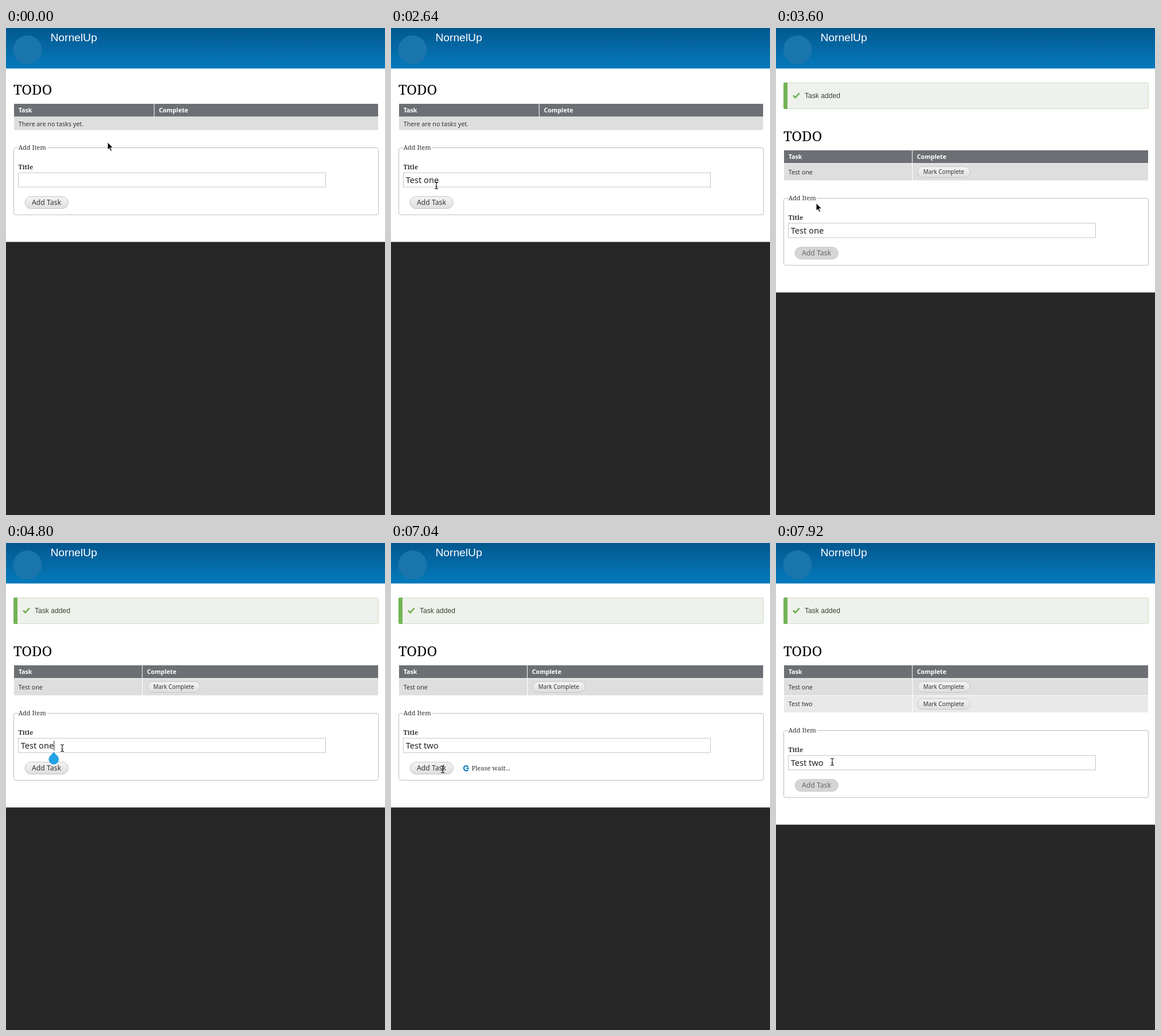
Write an HTML page that moves like this. It is 660 by 848 pixels and loops after 8000 ms.

```html
<!DOCTYPE html>
<html lang="en">
<head>
<meta charset="utf-8">
<title>Todo list</title>
<style>
  html, body { margin: 0; width: 100%; height: 100%; overflow: hidden; background: #272727; }
  svg { display: block; width: 660px; height: 848px; }
  text { font: 10.7px "Noto Sans", "Open Sans", sans-serif; fill: #333; white-space: pre; }
  .serif { font: 11px "Noto Serif", serif; }
  .bold { font-weight: bold; }
  .site { font: 19.2px "Liberation Sans", Arial, sans-serif; fill: #fff; }
  .note { font: 12.1px "Liberation Sans", Arial, sans-serif; fill: #3a4733; }
  .h1 { font-size: 24px; fill: #000; }
  .th { font-weight: bold; fill: #fff; }
  .small { font-size: 9.9px; }
  .mid { font-size: 12.2px; }
  .entry { font-size: 14.6px; fill: #222; }
  .pill { fill: url(#pill); stroke: #c6c6c6; }
  .off .pill { fill: #d5d5d5; stroke: #cbcbcb; }
  .off text { fill: #666; }

  /* layout for an empty list, one task, two tasks */
  .one, .two { display: none; }
  [data-tasks="1"] .one, [data-tasks="2"] .one, [data-tasks="2"] .two { display: inline; }
  [data-tasks="1"] .none, [data-tasks="2"] .none { display: none; }
  [data-tasks="1"] .list, [data-tasks="2"] .list { transform: translateY(81px); }
  [data-tasks="1"] .col, [data-tasks="2"] .col { transform: translateX(-20.7px); }
  [data-tasks="1"] .form { transform: translateY(88px); }
  [data-tasks="2"] .form { transform: translateY(118px); }
</style>
</head>
<body>
<svg id="stage" viewBox="0 0 660 848" data-tasks="0">
  <defs>
    <linearGradient id="head" x2="0" y2="1">
      <stop stop-color="#03588f"/><stop offset="1" stop-color="#057abc"/>
    </linearGradient>
    <linearGradient id="pill" x2="0" y2="1">
      <stop stop-color="#f4f4f4"/><stop offset="1" stop-color="#dedede"/>
    </linearGradient>
  </defs>

  <rect width="660" height="848" fill="#272727"/>
  <g class="form"><rect y="-130" width="660" height="502.5" fill="#fff"/></g>
  <rect width="660" height="70.5" fill="url(#head)"/>
  <circle cx="37.5" cy="38" r="25" fill="#1b75ad"/>
  <text class="site" x="77.5" y="23.3">NornelUp</text>

  <g class="one">
    <rect x="13.5" y="95.5" width="635" height="45" rx="2" fill="#eff1ec" stroke="#c9e1bd"/>
    <path d="M15 95H20V141H15Q13 141 13 139V97Q13 95 15 95Z" fill="#73b355"/>
    <path d="M30 117.5L33.7 121.3L40.7 113.3" fill="none" stroke="#73b355" stroke-width="2.8"/>
    <text class="note" x="50" y="122">Task added</text>
  </g>

  <g class="list">
    <text class="serif h1" x="13" y="115.5">TODO</text>
    <rect x="14" y="132" width="634" height="22.3" fill="#6c7075"/>
    <text class="th" x="21.7" y="147.3">Task</text>
    <g class="none">
      <rect x="14" y="155" width="634" height="22.7" fill="#dedede"/>
      <text x="21.7" y="170.7">There are no tasks yet.</text>
    </g>
    <g class="col">
      <rect x="257.5" y="132" width="1" height="22.5" fill="#fff"/>
      <text class="th" x="266.2" y="147.3">Complete</text>
    </g>
  </g>

  <g class="one">
    <rect x="14" y="236.5" width="634" height="28.8" fill="#dedede"/>
    <rect x="237" y="236" width="1" height="30" fill="#fff"/>
    <text x="21.7" y="254.6">Test one</text>
    <rect class="pill" x="246.5" y="241.5" width="91.5" height="18.5" rx="9.2"/>
    <text class="small" x="256.5" y="254.4">Mark Complete</text>
  </g>
  <g class="two">
    <rect x="14" y="266.3" width="634" height="28.7" fill="#e9e9e9"/>
    <rect x="237" y="266" width="1" height="29" fill="#fff"/>
    <text x="21.7" y="284.4">Test two</text>
    <rect class="pill" x="246.5" y="271.2" width="91.5" height="18.5" rx="9.2"/>
    <text class="small" x="256.5" y="284.1">Mark Complete</text>
  </g>

  <g class="form">
    <rect x="13.5" y="208.5" width="635" height="116.7" rx="3.5" fill="none" stroke="#bcbcbc"/>
    <rect x="21" y="206" width="51" height="5" fill="#fff"/>
    <text class="serif" x="21.5" y="212">Add Item</text>
    <text class="serif bold" x="21.5" y="245.6">Title</text>
    <rect x="21.5" y="252" width="535" height="25" fill="#fff" stroke="#c3c3c3"/>
    <text class="entry" id="entry" x="25.7" y="270"></text>
    <g id="button">
      <rect class="pill" x="33" y="293.5" width="75.3" height="21" rx="10.5"/>
      <text class="mid" x="45" y="308.4">Add Task</text>
    </g>
    <g id="wait">
      <g id="spin" fill="none" stroke="#0074bd" stroke-width="2">
        <path d="M3.6 -2.1A4.2 4.2 0 1 0 3.6 2.1"/>
        <path d="M0 0H5" stroke-width="1.8"/>
      </g>
      <text class="serif" x="140.5" y="308.3">Please wait...</text>
    </g>
    <g id="caret">
      <rect y="256.5" width="1" height="17" fill="#222"/>
      <path id="drop" d="M0 276L6.3 282.7A8.8 8.8 0 1 1 -6.3 282.7Z" fill="#22a3e3"/>
    </g>
  </g>

  <path id="arrow" d="M0 0V13.2L3 10.4L5.3 15.4L7.4 14.4L5.2 9.6H9.3Z" fill="#000" stroke="#fff" stroke-width=".9"/>
  <g id="beam" fill="none">
    <path d="M-3 -6Q0 -6 0 -4Q0 -6 3 -6M0 -5V5M-3 6Q0 6 0 4Q0 6 3 6M-1.5 1.5H1.5" stroke="#111" stroke-width="1.1"/>
  </g>
</svg>

<script>
const LOOP = 8000, STEP = 80;
const el = id => document.getElementById(id);
const show = (node, on) => { node.style.display = on ? 'inline' : 'none'; };
const within = (t, from, to) => t >= from && t < to;

// pointer stops: time, x, y
const path = [
  [0, 177, 199], [160, 177, 199], [800, 84, 272], [1040, 79, 274], [2720, 79, 274],
  [3120, 70, 305], [3760, 70, 305], [4400, 97, 356], [4800, 98, 357], [5360, 98, 364],
  [6160, 92, 387], [6480, 90, 402], [7040, 90, 394], [7440, 96, 384], [7760, 98, 381], [8000, 98, 381]
];

function pointer(t) {
  const i = path.findIndex(p => p[0] > t);
  const [t0, x0, y0] = path[i - 1], [t1, x1, y1] = path[i];
  const k = (t - t0) / (t1 - t0), e = k * k * (3 - 2 * k);
  return [x0 + (x1 - x0) * e, y0 + (y1 - y0) * e];
}

function typed(t) {
  const keys = (from, gap) => Math.max(0, Math.floor((t - from) / gap) + 1);
  if (t < 5040) return 'Test one'.slice(0, keys(1280, 160));
  if (t < 5520) return 'Test one'.slice(0, Math.max(5, 8 - keys(5040, 160)));
  return 'Test two'.slice(0, 5 + keys(5600, 160));
}

function render(t) {
  const tasks = t < 3600 ? 0 : t < 7440 ? 1 : 2;
  el('stage').dataset.tasks = tasks;

  const entry = el('entry');
  entry.textContent = typed(t);
  const end = 25.7 + (entry.textContent ? entry.getComputedTextLength() : 0);

  const focus = within(t, 960, 3120) ? 960 : within(t, 4560, 6480) ? 4560 : -1;
  show(el('caret'), focus >= 0 && Math.floor((t - focus) / 500) % 2 === 0 || within(t, 4560, 5040));
  show(el('drop'), within(t, 4560, 5040));
  el('caret').setAttribute('transform', `translate(${end})`);

  el('button').classList.toggle('off', within(t, 3600, 4480) || t >= 7440);
  show(el('wait'), within(t, 3200, 3600) || within(t, 6560, 7440));
  const turn = t < 4000 ? (t - 3520) * 0.5625 - 45 : (t - 7040) * 0.5625;
  el('spin').setAttribute('transform', `translate(131 304.3) rotate(${turn})`);

  const [x, y] = pointer(t);
  const isBeam = within(t, 640, 2880) || t >= 4240;
  show(el('arrow'), !isBeam);
  show(el('beam'), isBeam);
  el(isBeam ? 'beam' : 'arrow').setAttribute('transform', `translate(${x} ${y})`);
}

const start = performance.now();
function tick() {
  const t = (performance.now() - start) % LOOP;
  render(Math.floor(t / STEP) * STEP);
  requestAnimationFrame(tick);
}
tick();
</script>
</body>
</html>
```
